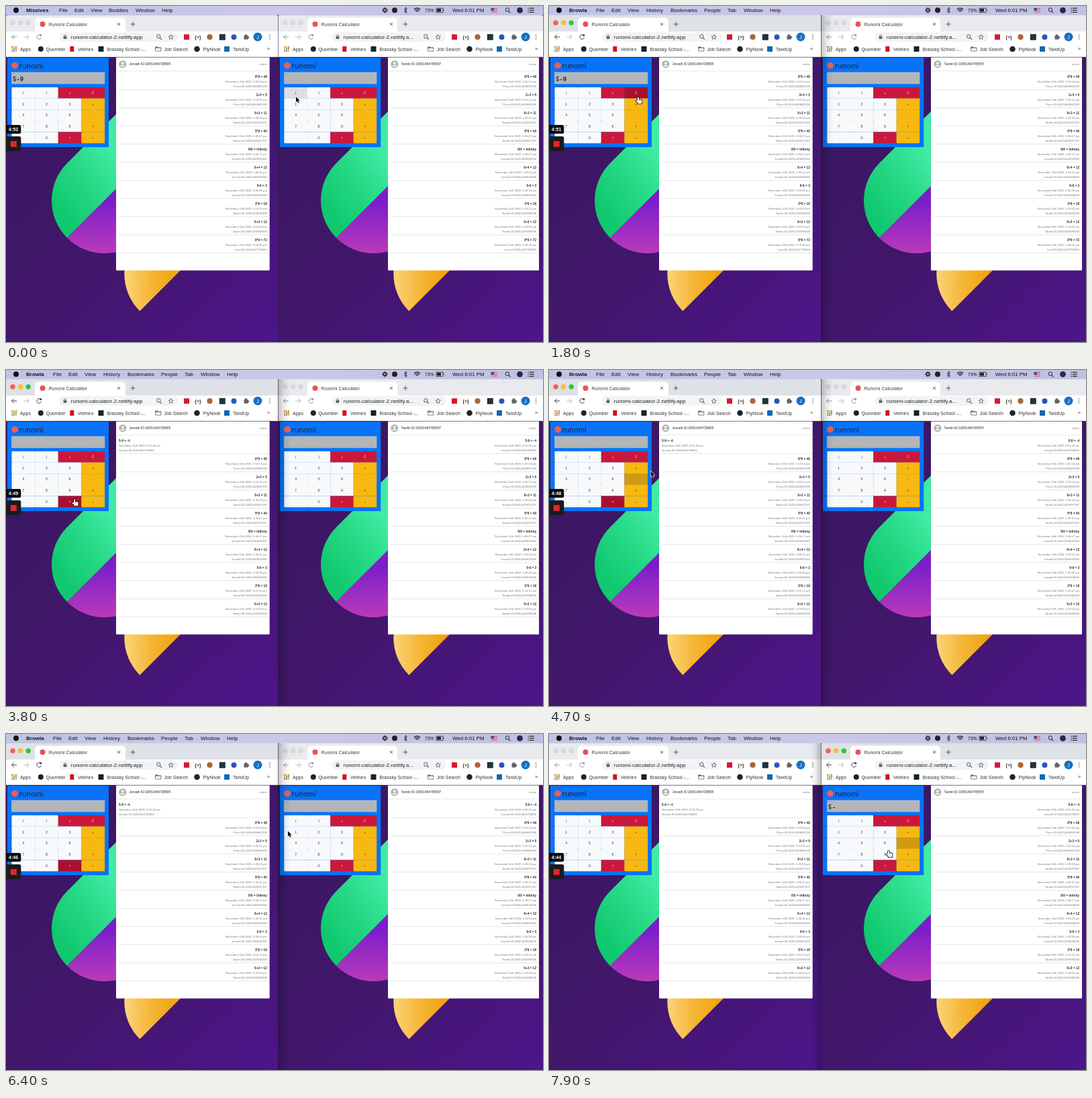
Animation, 800 px wide and 500 px high, one loop 8000 ms. Source, as an HTML page with a canvas:

```html
<!DOCTYPE html>
<html lang="en">
<head>
<meta charset="utf-8">
<title>Shared calculator</title>
<style>
html, body { margin: 0; width: 100%; height: 100%; overflow: hidden; background: #431770; }
canvas { display: block; width: 800px; height: 500px; }
</style>
</head>
<body>
<canvas id="stage"></canvas>
<script>
const LOOP = 8000;
const SANS = '"Liberation Sans", Arial, sans-serif';
const MONO = '"DejaVu Sans Mono", "Liberation Mono", monospace';
const canvas = document.getElementById('stage');
const c = canvas.getContext('2d');
const dpr = window.devicePixelRatio || 1;
canvas.width = 800 * dpr;
canvas.height = 500 * dpr;

// time, x, y of the pointer tip
const PATH = [
  [0, 432, 135], [200, 431, 134], [850, 150, 125], [1100, 145, 124], [1550, 145, 125],
  [2300, 99, 168], [2600, 94, 196], [2900, 98, 195], [3800, 102, 193], [4200, 103, 192],
  [5200, 200, 109], [5700, 204, 107], [5950, 206, 108], [6500, 440, 148], [6800, 466, 164],
  [7100, 467, 165], [7250, 468, 165], [7550, 533, 161], [7700, 530, 163], [7900, 506, 174],
  [8000, 500, 177]
];
const LABELS = ['(', ')', '«', 'C', '1', '2', '3', '+', '4', '5', '6', '-',
  '7', '8', '9', '×', '.', '0', '=', '÷'];
const USERS = {
  J: 'Jorvath ID:16051449620026', T: 'Tamlin ID:16051450037297',
  U: 'Tamlin ID:16051439396208', P: 'Pevro ID:16051469881599',
  L: 'Lurin ID:16051437708019', me: 'Jorvath ID:16051464728805'
};
const HISTORY = [
  ['8*6 = 48', '5:52:54', 'P'], ['2+3 = 5', '5:52:51', 'P'], ['8+3 = 11', '5:36:50', 'T'],
  ['5*8 = 40', '5:36:47', 'T'], ['8/0 = Infinity', '5:36:17', 'J'], ['8+4 = 12', '5:36:11', 'J'],
  ['9-6 = 3', '5:36:06', 'J'], ['3*6 = 18', '5:19:12', 'U'], ['9+3 = 12', '5:19:03', 'U'],
  ['8*9 = 72', '5:18:45', 'L']
];
const NEWEST = ['5-9 = -4', '6:01:45', 'me'];

const WINDOWS = [
  { x: 0, w: 405.5, tab: 43, tabW: 135, lights: 10, nav: 0, box: [79, 178], url: 'runomi-calculator-2.netlify.app',
    mag: 228, ext: 269, marks: 0, more: 391, calc: [2, 151], keys: 8.5, keyW: 34.6, panel: [164, 228.7],
    art: 0, user: USERS.me },
  { x: 405.5, w: 394.5, tab: 449, tabW: 134, lights: 416, nav: 405, box: [485, 170], url: 'runomi-calculator-2.netlify.a...',
    mag: 626, ext: 668, marks: 406, more: 790, calc: [408, 150.3], keys: 414.4, keyW: 34.4, panel: [569, 225],
    art: 401, user: 'Tamlin ID:16051464765557' }
];

function rect(x, y, w, h, fill, r = 0) {
  c.fillStyle = fill;
  c.beginPath();
  c.roundRect(x, y, w, h, r);
  c.fill();
}
function disc(x, y, r, fill) {
  c.fillStyle = fill;
  c.beginPath();
  c.arc(x, y, r, 0, Math.PI * 2);
  c.fill();
}
function ring(x, y, r, color, a = 0, b = Math.PI * 2, width = 1) {
  c.strokeStyle = color;
  c.lineWidth = width;
  c.beginPath();
  c.arc(x, y, r, a, b);
  c.stroke();
}
function line(color, width, ...p) {
  c.strokeStyle = color;
  c.lineWidth = width;
  c.beginPath();
  for (let i = 0; i < p.length; i += 2) c.lineTo(p[i], p[i + 1]);
  c.stroke();
}
function text(s, x, y, size, color = '#222', align = 'left', weight = 400, font = SANS) {
  c.font = `${weight} ${size}px ${font}`;
  c.textAlign = align;
  c.fillStyle = color;
  c.fillText(s, x, y);
}
function gradient(x0, y0, x1, y1, ...stops) {
  const g = c.createLinearGradient(x0, y0, x1, y1);
  stops.forEach((s, i) => g.addColorStop(i / (stops.length - 1), s));
  return g;
}

function pointer(t) {
  t = Math.max(0, t);
  let i = 1;
  while (i < PATH.length - 1 && PATH[i][0] < t) i++;
  const [t0, x0, y0] = PATH[i - 1], [t1, x1, y1] = PATH[i];
  let k = Math.min(1, (t - t0) / (t1 - t0));
  k = k * k * (3 - 2 * k);
  return [x0 + (x1 - x0) * k, y0 + (y1 - y0) * k];
}
function keyAt(win, [x, y]) {
  const col = Math.floor((x - win.keys) / win.keyW), row = Math.floor((y - 121) / 16.6);
  const inside = x > win.keys && x < win.keys + 4 * win.keyW - 3 && row >= 0 && row < 5;
  return inside ? row * 4 + col : -1;
}

function magnifier(x, y, r, color) {
  ring(x - 0.7, y - 0.7, r, color);
  line(color, 1.2, x + r * 0.5, y + r * 0.5, x + r * 1.4, y + r * 1.4);
}

function drawMenu(t) {
  rect(0, 0, 800, 13.5, gradient(0, 0, 800, 0, '#bfc3e4', '#cac8e8', '#bfc0e2'));
  disc(15, 6.3, 4, '#111');
  const names = t < 800
    ? [['Missives', 30], ['File', 79], ['Edit', 102], ['View', 126], ['Buddies', 153], ['Window', 193], ['Help', 232]]
    : [['Browla', 30], ['File', 70], ['Edit', 93], ['View', 117], ['History', 145], ['Bookmarks', 181],
       ['People', 231], ['Tab', 266], ['Window', 290], ['Help', 329]];
  names.forEach(([s, x], i) => text(s, x, 9.2, 8, '#111', 'left', i ? 400 : 700));
  disc(564.5, 6.3, 3, '#222');
  for (let i = 0; i < 8; i++) {
    const a = i * Math.PI / 4, u = Math.cos(a), v = Math.sin(a);
    line('#222', 1, 564.5 + u * 2.5, 6.3 + v * 2.5, 564.5 + u * 4.6, 6.3 + v * 4.6);
  }
  disc(564.5, 6.3, 1.2, '#ddd');
  disc(579, 6.3, 4, '#222');
  line('#222', 0.9, 593, 4, 597.5, 8.5, 595.2, 10.5, 595.2, 2, 597.5, 4, 593, 8.5);
  for (const r of [2.4, 4.6, 6.8]) ring(612.5, 10, r, '#222', -2.35, -0.8, 1.2);
  text('73%', 624, 9, 6.8, '#111');
  c.strokeStyle = '#333';
  c.lineWidth = 0.8;
  c.strokeRect(641, 3.2, 10, 6.2);
  rect(642, 4.2, 6, 4.2, '#222');
  rect(651.6, 5, 1, 2.6, '#333');
  text('Wed 6:01 PM', 665, 9.2, 7.9, '#111');
  rect(722.5, 3, 9.5, 6.8, '#f2f2f2');
  for (let i = 0; i < 4; i++) rect(722.5, 3 + i * 1.9, 9.5, 1, '#c34050');
  rect(722.5, 3, 4.4, 3.8, '#384c90');
  magnifier(747.5, 6.3, 2.7, '#222');
  disc(765.5, 6.3, 4.4, '#2b2747');
  for (const y of [3.3, 6.3, 9.3]) {
    rect(777.5, y - 0.6, 1.3, 1.2, '#222');
    rect(780, y - 0.6, 6.7, 1.2, '#222');
  }
}

function drawFrame(w, active) {
  const icon = active ? '#3c4043' : '#8f9397', faint = '#b6b9bc';
  rect(w.x, 13.5, w.w, 25, active ? '#dee1e6' : '#e8eaed', [4, 4, 0, 0]);
  ['#fa5e57', '#fbbd2e', '#2bc840'].forEach((col, i) =>
    disc(w.lights + i * 11.6, 25, 3.7, active ? col : '#d6d8dc'));
  rect(w.tab, 17.5, w.tabW, 22, '#fff', [5, 5, 0, 0]);
  disc(w.tab + 11.5, 27, 4, '#e8505b');
  text('Runomi Calculator', w.tab + 20.5, 29.5, 7, '#3c4043');
  const cx = w.tab + 125;
  line('#555', 0.9, cx - 2, 25, cx + 2, 29);
  line('#555', 0.9, cx + 2, 25, cx - 2, 29);
  const px = w.tab + 146;
  line('#555', 1, px - 3.4, 27, px + 3.4, 27);
  line('#555', 1, px, 23.6, px, 30.4);

  rect(w.x, 38, w.w, 38, '#fff');
  const n = w.nav;
  line(icon, 1, n + 16, 46, n + 8.5, 46);
  line(icon, 1, n + 12, 42.5, n + 8.5, 46, n + 12, 49.5);
  line(faint, 1, n + 26.5, 46, n + 34, 46);
  line(faint, 1, n + 30.5, 42.5, n + 34, 46, n + 30.5, 49.5);
  ring(n + 49.3, 46, 3.3, icon, 0.3, 5.6);
  rect(n + 50.4, 42.2, 2.7, 2.7, icon);
  rect(w.box[0], 39.3, w.box[1], 14, '#f1f3f4', 7);
  const lx = w.box[0] + 9;
  rect(lx - 2.4, 45, 4.8, 4, '#5f6368', 0.6);
  ring(lx, 44.7, 1.6, '#5f6368', Math.PI, 0, 0.9);
  text(w.url, w.box[0] + 17.8, 48.9, 8, '#222');
  magnifier(w.mag, 46, 2.7, '#555');
  c.beginPath();
  for (let i = 0; i < 10; i++) {
    const a = i * Math.PI / 5 - Math.PI / 2, r = i % 2 ? 1.7 : 3.9;
    c.lineTo(w.mag + 17.7 + r * Math.cos(a), 46.3 + r * Math.sin(a));
  }
  c.closePath();
  c.strokeStyle = '#555';
  c.lineWidth = 0.8;
  c.stroke();

  const e = w.ext;
  rect(e - 4, 42.2, 8, 8, '#d81830');
  text('{≡}', e + 17, 48.5, 7, '#333', 'center', 700);
  disc(e + 34.5, 46.2, 4.1, '#a9673a');
  rect(e + 48.8, 41.8, 9, 9, '#20343c');
  disc(e + 70.5, 46.2, 4, '#2854c0');
  rect(e + 85.5, 43.8, 6.2, 6, '#5f6368', 0.8);
  disc(e + 88.4, 43.4, 1.5, '#5f6368');
  disc(e + 92, 46.8, 1.4, '#5f6368');
  disc(e + 106, 46, 6.5, '#1670c4');
  text('J', e + 106, 48.5, 7, '#fff', 'center');
  const kx = w.x ? 789.5 : 393;
  for (const y of [43, 46, 49]) disc(kx, y, 0.8, '#555');

  const m = w.marks, dots = ['#e34b3d', '#e8a820', '#3c9e50'];
  for (let i = 0; i < 9; i++)
    rect(m + 8.3 + i % 3 * 2.8, 60.2 + Math.floor(i / 3) * 2.8, 2, 2, dots[(i + Math.floor(i / 3)) % 3]);
  const mark = (s, x) => text(s, m + x, 66.5, 7, '#333');
  mark('Apps', 21);
  disc(m + 51.8, 64, 4, '#222');
  mark('Quomber', 59.5);
  rect(m + 95.3, 60, 6, 8, '#d01020');
  mark('Velmiro', 107);
  rect(m + 137.5, 60, 8, 8, '#122428');
  mark('Brassky School -...', 150.5);
  rect(m + 222.3, 60.5, 4, 3, '#666', 0.6);
  rect(m + 222.3, 61.4, 9, 6.2, '#666', 0.8);
  rect(m + 223.2, 62.8, 7.2, 3.9, '#fff');
  mark('Job Search', 235.5);
  disc(m + 284.5, 64, 4.3, '#20242a');
  mark('PlyNook', 293.5);
  rect(m + 325, 60, 8, 8, '#1068b0', 0.8);
  mark('TandUp', 338);
  text('»', w.more, 66.3, 7.5, '#444', 'center');
  rect(w.x, 75.2, w.w, 0.8, '#cfd1d5');
}

function halfDisc(x, y, r, from, fill) {
  c.fillStyle = fill;
  c.beginPath();
  c.arc(x, y, r, from, from + Math.PI);
  c.fill();
}

function drawArt(w) {
  const r = 78.5, x = 146.5, y = 289.5, q = Math.PI / 4, s = r * Math.SQRT1_2, reach = 110;
  c.save();
  c.beginPath();
  c.rect(w.x, 76, w.w, 424);
  c.clip();
  c.translate(w.art, 0);
  c.fillStyle = gradient(0, 76, 400, 500, '#381761', '#411769', '#4c158a');
  c.fillRect(0, 76, 410, 424);
  halfDisc(x, y, r, -q, gradient(x, y, x, y + r, '#7a1dca', '#9a2cc2', '#b93bb9'));
  c.fillStyle = gradient(75, 300, 170, 230, '#10c86e', '#25d884', '#40eba4');
  c.beginPath();
  c.arc(x, y, r, 3 * q, 5 * q);
  c.lineTo(x - s + reach, y - s - reach);
  c.lineTo(x + reach, y - reach);
  c.closePath();
  c.fill();
  halfDisc(254.8, 398.5, r, 3 * q, gradient(177, 420, 255, 420, '#fbd478', '#f5b536', '#f0a30c'));
  c.restore();
}

function drawCalc(w, entry, hover, focus) {
  const [x, width] = w.calc, kw = w.keyW, kx = w.keys;
  rect(x, 77, width, 133, '#0873f6');
  disc(x + 11, 88.5, 4.8, '#f0604c');
  text('runomi', x + 17.8, 92.6, 11.6, '#15264e', 'left', 400, 'Lato, sans-serif');
  rect(kx, 98.8, kw * 4, 17, '#b4b5b7');
  c.setLineDash([1.2, 1.2]);
  c.strokeStyle = '#e4e4e6';
  c.lineWidth = 0.7;
  c.strokeRect(kx, 98.8, kw * 4, 17);
  c.setLineDash([]);
  text(entry, kx + 1.7, 112.4, 8.8, '#20242a', 'left', 700, MONO);
  LABELS.forEach((label, i) => {
    const col = i % 4, row = Math.floor(i / 4), px = kx + col * kw, py = 121 + row * 16.6;
    const red = [2, 3, 18].includes(i), gold = col === 3 && !red;
    const dark = i === hover || i === focus;
    const fill = red ? (dark ? '#aa102e' : '#c9183c')
      : gold ? (dark ? '#cf9b12' : '#f7b811') : (dark ? '#dcdfe3' : '#f7f9fb');
    rect(px, py, kw + 0.2, 16.8, fill);
    text(label, px + kw / 2, py + 10.1, 5.2, red ? '#f6dfe4' : '#33383e', 'center');
  });
  for (let r = 0; r < 6; r++)
    for (let k = 0; k < 4; k++) rect(kx + k * kw - 0.6, 120.6 + r * 16.6, 1.2, 0.8, 'rgba(30,40,60,.5)');
}

function drawPanel(w, added) {
  const [x, width] = w.panel, right = x + width - 3.8;
  rect(x, 76.6, width, 317, '#fff', 1);
  disc(x + 9.8, 86.6, 5.6, '#b4b4b4');
  disc(x + 9.8, 85, 1.8, '#fff');
  c.fillStyle = '#fff';
  c.beginPath();
  c.ellipse(x + 9.8, 89.7, 3.3, 2, 0, Math.PI, 0);
  c.fill();
  text(w.user, x + 19.5, 88.2, 4.9, '#222');
  text('online', right, 88, 4.2, '#777', 'right');
  rect(x + 0.5, 96.6, width - 1, 0.6, '#dcdee1');
  const list = added ? [NEWEST, ...HISTORY.slice(0, 9)] : HISTORY;
  list.forEach(([sum, time, who], i) => {
    const y = 106.8 + i * 27, mine = who === 'me' && !w.x;
    const tx = mine ? x + 4 : right, align = mine ? 'left' : 'right';
    text(sum, tx, y, 4.8, '#333', align, 700);
    text(`November 11th 2020, ${time} pm`, tx, y + 7.1, 4.2, '#707478', align);
    text(USERS[who], tx, y + 14, 4.2, '#707478', align);
    rect(x + 4, y + 17.3, width - 4.5, 0.7, '#dcdee1');
  });
}

function drawRecorder(t) {
  const s = 52 - (t < 900 ? 0 : Math.floor((t - 900) / 1000) + 1);
  rect(-3, 177, 25.3, 13, '#0c0c0e', 2.5);
  text('4:' + s, 11, 186.1, 7.2, '#fff', 'center', 700);
  rect(-3, 194, 25.3, 22, '#1b1b1f', 2.5);
  rect(6.8, 201, 9, 8.8, '#e32632', 0.5);
}

function drawPointer([x, y], hand) {
  c.save();
  c.translate(x, y);
  c.lineJoin = 'round';
  c.beginPath();
  if (hand) {
    c.roundRect(-1, -0.5, 2.1, 7, 1);
    c.roundRect(-1, 3, 6.5, 6.2, 1.8);
    c.roundRect(-3.4, 4.2, 3.6, 2.4, 1.2);
    c.strokeStyle = '#111';
    c.lineWidth = 1.6;
    c.stroke();
    c.fillStyle = '#fff';
    c.fill();
    for (const k of [1.3, 3.2]) line('#333', 0.5, k, 3.3, k, 5.3);
  } else {
    [[0, 0], [0, 8], [1.8, 6.4], [3.2, 9.4], [4.6, 8.8], [3.3, 5.9], [5.7, 5.7]].forEach(p => c.lineTo(...p));
    c.closePath();
    c.strokeStyle = '#fff';
    c.lineWidth = 1.2;
    c.stroke();
    c.fillStyle = '#0a0a0a';
    c.fill();
  }
  c.restore();
}

// shadow of the front window on the one behind it
function drawShadow(front) {
  const reach = front === 0 ? 19 : -15;
  c.fillStyle = gradient(405, 0, 405 + reach, 0, 'rgba(0,0,0,.24)', 'rgba(0,0,0,.07)', 'rgba(0,0,0,0)');
  c.fillRect(405, 14, reach, 486);
}

function draw(t) {
  c.setTransform(dpr, 0, 0, dpr, 0, 0);
  const front = t < 800 ? -1 : t < 6500 ? 0 : 1;
  const tip = pointer(t), trail = pointer(t - 150);
  const added = t >= 3100;
  const entries = [added ? '' : '5-9', t < 6950 ? '' : t < 7600 ? '5' : '5-'];
  WINDOWS.forEach((w, i) => {
    drawArt(w);
    drawCalc(w, entries[i], keyAt(w, trail), !i && t > 3000 && t < 6500 ? 18 : -1);
    drawPanel(w, added);
    drawFrame(w, i === front);
  });
  if (front >= 0) drawShadow(front);
  rect(405, 16, 0.9, 484, 'rgba(40,30,60,.55)');
  drawMenu(t);
  drawRecorder(t);
  drawPointer(tip, front >= 0 && keyAt(WINDOWS[front], tip) >= 0);
}

const start = performance.now();
function tick() {
  draw((performance.now() - start) % LOOP);
  requestAnimationFrame(tick);
}
tick();
</script>
</body>
</html>
```
